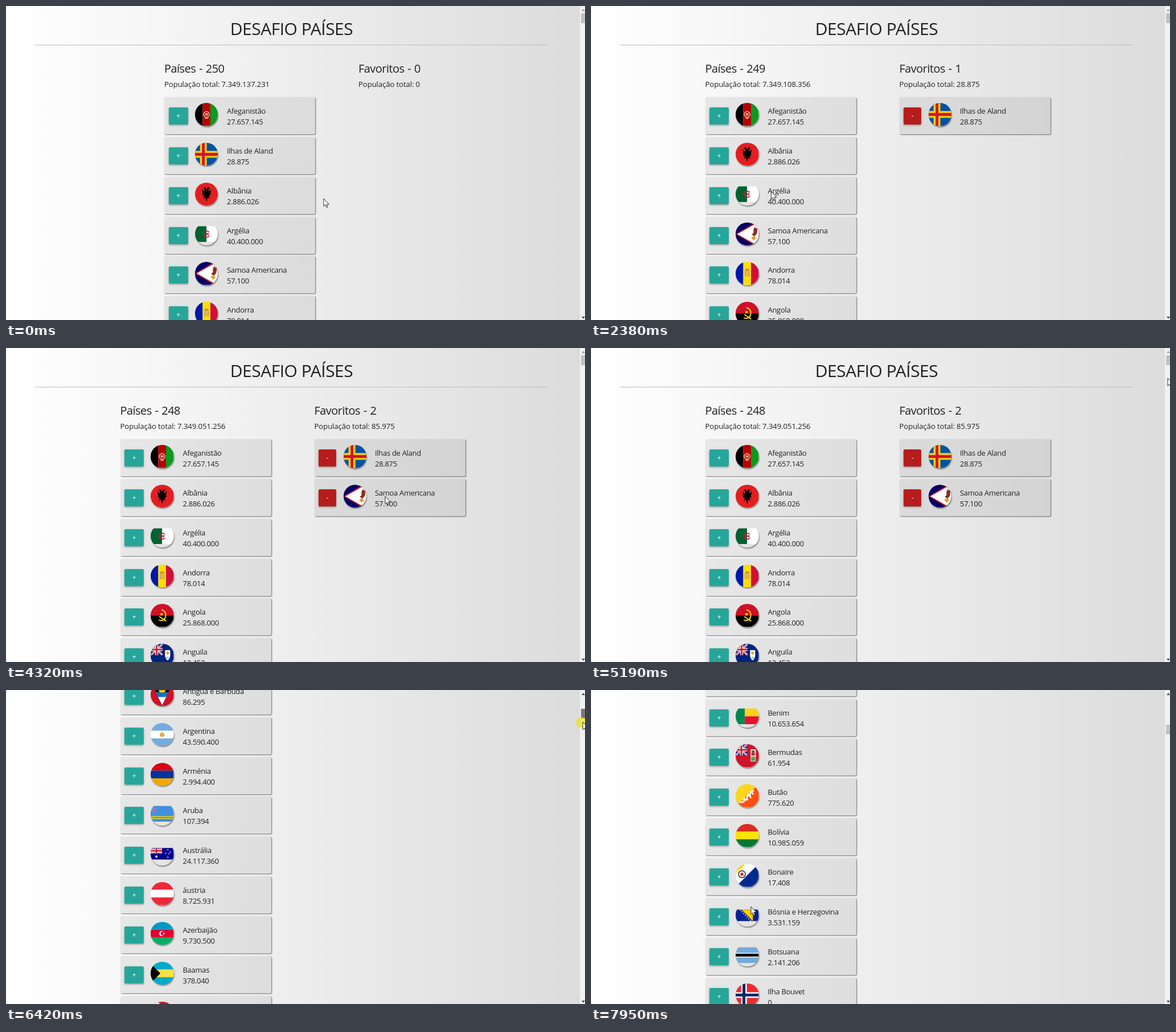
Recreate the animation shown at these times as an HTML page. Size 1017x551 px, loop 8 s.

```html
<!DOCTYPE html>
<html lang="pt">
<head>
<meta charset="utf-8">
<style>
html, body { margin: 0; width: 100%; height: 100%; overflow: hidden; }
body { position: relative; background: linear-gradient(to right, #fff, #dcdcdc 1008px); color: #212121; font: 13px/20px "Open Sans", "Noto Sans", sans-serif; letter-spacing: -.3px; }
body *, .col { position: absolute; white-space: nowrap; margin: 0; }
#page { left: 0; top: 0; width: 1003px; }
h1 { top: 20px; width: 100%; text-align: center; font-weight: 400; font-size: 30px; line-height: 40px; letter-spacing: -.5px; }
hr { left: 51px; top: 68px; width: 901px; height: 1px; border: 0; background: #bdbdbd; }
h2 { top: 96px; font-weight: 400; font-size: 20px; line-height: 28px; letter-spacing: -.55px; word-spacing: 1.2px; }
.total { top: 127px; font-size: 13.2px; letter-spacing: -.12px; }
.card { width: 265px; height: 65px; border-radius: 2px; background: rgba(0,0,0,.07); box-shadow: 1px 1px 2px rgba(0,0,0,.55); }
.btn { left: 7.5px; top: 18px; width: 34px; height: 30px; border-radius: 2px; background: #26a69a; color: #fff; font-size: 12px; line-height: 29px; text-align: center; box-shadow: 0 2px 2px rgba(0,0,0,.14), 0 1px 4px rgba(0,0,0,.2); }
.hover .btn { background: #2bbbad; }
.flag { left: 53.5px; top: 10px; width: 40.5px; height: 40.5px; border-radius: 50%; overflow: hidden; box-shadow: 1px 2px 2px rgba(0,0,0,.4); }
.name { left: 110px; top: 14px; }
.pop { left: 110px; top: 33px; }
#favs .btn { width: 31px; background: #b71c1c; }
#favs .flag { left: 51px; }
#favs .name, #favs .pop { left: 106.5px; }
#bar { left: 1008px; top: 0; width: 9px; height: 551px; background: #f1f1f1; }
#thumb { left: 2px; width: 7px; height: 17px; }
#bar i { left: 3px; border: 3px solid transparent; }
#up { top: 2px; border-bottom: 4px solid !important; }
#down { top: 545px; border-top: 4px solid #505050 !important; }
#spot { width: 19px; height: 19px; border-radius: 50%; background: rgba(240,225,0,.62); }
#cursor { width: 24px; height: 24px; overflow: visible; fill: #fff; stroke: #111; stroke-width: .9; stroke-linejoin: round; }
</style>
</head>
<body>
<div id="page">
  <h1>DESAFIO PAÍSES</h1><hr>
  <div class="col" id="list"></div>
  <div class="col" id="favs"></div>
</div>
<div id="bar"><i id="up"></i><i id="down"></i><div id="thumb"></div></div>
<div id="spot"></div>
<svg id="cursor"><path id="shape"/></svg>
<script>
const $ = id => document.getElementById(id);

// Flag parts, in a 40 x 40 box
const path = (d, c, extra = '') => `<path d="${d}" fill="${c}" ${extra}/>`;
const rect = (x, y, w, h, c) => path(`M${x} ${y}h${w}v${h}h${-w}z`, c);
const dot = (x, y, r, c) => `<circle cx="${x}" cy="${y}" r="${r}" fill="${c}"/>`;
const ring = (x, y, r, c, w) => `<circle cx="${x}" cy="${y}" r="${r}" fill="none" stroke="${c}" stroke-width="${w}"/>`;
const rows = (...cs) => cs.map((c, i) => rect(0, i * 40 / cs.length, 40, 40 / cs.length, c)).join('');
const cols = (...cs) => cs.map((c, i) => rect(i * 40 / cs.length, 0, 40 / cs.length, 40, c)).join('');
const star = (x, y, r, c, n = 5) => {
  let d = '';
  for (let i = 0; i < 2 * n; i++) {
    const a = i * Math.PI / n, q = i % 2 ? r * .42 : r;
    d += (i ? 'L' : 'M') + (x + q * Math.sin(a)).toFixed(2) + ' ' + (y - q * Math.cos(a)).toFixed(2);
  }
  return path(d + 'z', c);
};
const cross = (x, c, w) => rect(0, 20 - w / 2, 40, w, c) + rect(x - w / 2, 0, w, 40, c);
const jack = (y, w, h) => {
  const line = (d, c, s) => path(d, 'none', `stroke="${c}" stroke-width="${s}"`);
  const diag = `M0 0L${w} ${h}M0 ${h}L${w} 0`, plus = `M${w / 2} 0V${h}M0 ${h / 2}H${w}`;
  return `<svg y="${y}" width="${w}" height="${h}">${rect(0, 0, w, h, '#00247d')}${line(diag, '#fff', 3)}${line(diag, '#cf142b', 1)}${line(plus, '#fff', 5)}${line(plus, '#cf142b', 2.6)}</svg>`;
};
const crescent = (x, y, r, c, back) => dot(x, y, r, c) + dot(x + r * .3, y, r * .75, back);
const eagle = 'M20 12l-2-4-4 1 3 3-1 3-4-4 1 5-1 0 2 3-2 1 3 2-2 2 4-1-3 5 4-2 2 7 2-7 4 2-3-5 4 1-2-2 3-2-2-1 2-3-1 0 1-5-4 4-1-3 3-3-4-1z';

const countries = [
  ['Afeganistão', 27657145, cols('#000', '#b90000', '#0a9a1f') + ring(20, 20, 5, '#e8bba8', 1.5) + rect(17.5, 18, 5, 4, '#e0a58c') + rect(17, 26, 6, 1.5, '#e8bba8')],
  ['Ilhas de Aland', 28875, rect(0, 0, 40, 40, '#0053a5') + cross(14.5, '#ffce00', 11.8) + cross(14.5, '#d21034', 4.7)],
  ['Albânia', 2886026, rect(0, 0, 40, 40, '#e41e20') + path(eagle, '#000')],
  ['Argélia', 40400000, rect(0, 6.5, 20, 27, '#006233') + rect(20, 6.5, 20, 27, '#fff') + ring(20, 20, 5.3, '#d21034', 1.8) + rect(23, 17, 4, 6, '#fff') + star(22, 20, 3.2, '#d21034')],
  ['Samoa Americana', 57100, rect(0, 0, 40, 40, '#000066') + path('M0 20L40-4V44z', '#bd1021') + path('M3 20L40-1V41z', '#fff') + path('M33 8l5 3-1 8-4 5-5-3 3-3 0-6z', '#8a3021') + path('M27 26l5-3 4 4-5 4z', '#e0a030')],
  ['Andorra', 78014, cols('#0018a8', '#fedf00', '#d0103a') + rect(16, 14, 8, 11, '#d29a52') + rect(17.5, 16, 5, 8, '#e6b95c') + rect(17, 12, 6, 2, '#c7793b')],
  ['Angola', 25868000, rows('#ce1126', '#000') + path('M19 10q9 3 7 12t-12 6', 'none', 'stroke="#f9d616" stroke-width="2"') + path('M15 22L27 30', 'none', 'stroke="#f9d616" stroke-width="2"') + star(19, 18, 3.5, '#f9d616')],
  ['Anguila', 13452, rect(0, 0, 40, 40, '#00247d') + jack(0, 21, 20) + path('M25 11h9v10q-1 6-4.5 8-3.5-2-4.5-8z', '#fff') + dot(29.5, 16, 2.5, '#f49a26') + rect(27, 23, 5, 3, '#85cfe4')],
  ['Antártida', 1000, rect(0, 0, 40, 40, '#3a7dce') + path('M9 12l5 5 4-5 9 1 5 6-2 7-9 5-5-6-6-2z', '#fff')],
  ['Antígua e Barbuda', 86295, rect(0, 0, 40, 40, '#ce1126') + path('M2 0H38L20 38z', '#000') + star(20, 17, 11, '#fcd116', 8) + path('M9 16H31L20 38z', '#0072c6') + path('M13 24H27L20 38z', '#fff')],
  ['Argentina', 43590400, rows('#74acdf', '#fff', '#74acdf') + dot(20, 20, 3.8, '#d99a2b') + dot(20, 20, 2, '#f0bd50')],
  ['Arménia', 2994400, rows('#d90012', '#0033a0', '#f2a800')],
  ['Aruba', 107394, rect(0, 6.5, 40, 27, '#418fde') + rect(0, 24, 40, 1.5, '#f9d616') + rect(0, 27.5, 40, 1.5, '#f9d616') + star(6.5, 13, 4, '#fff', 4) + star(6.5, 13, 3, '#d21034', 4)],
  ['Austrália', 24117360, rect(0, 10, 40, 20, '#00008b') + jack(10, 20, 10) + star(10, 25, 3, '#fff', 7) + [[30, 13], [34, 17], [26, 19], [30, 26], [32, 20]].map(([x, y]) => star(x, y, 1.5, '#fff', 7)).join('')],
  ['áustria', 8725931, rows('#ed2939', '#fff', '#ed2939')],
  ['Azerbaijão', 9730500, rows('#0098c3', '#e00034', '#00ae65') + crescent(19.5, 20, 4.5, '#fff', '#e00034') + star(23, 20, 2.2, '#fff', 8)],
  ['Baamas', 378040, rows('#00abc9', '#fae042', '#00abc9') + path('M0 3L17 20 0 37z', '#000')],
  ['Bahrein', 1404900, rect(0, 0, 40, 40, '#ce1126') + path('M0 0H11l6 4-6 4 6 4-6 4 6 4-6 4 6 4-6 4 6 4-6 4H0z', '#fff')],
  ['Bangladesh', 161006790, rect(0, 0, 40, 40, '#006a4e') + dot(18, 20, 10, '#f42a41')],
  ['Barbados', 285000, cols('#00267f', '#ffc726', '#00267f') + path('M16 13q0 10 4 10t4-10M20 12V29', 'none', 'stroke="#000" stroke-width="2"')],
  ['Bielorrússia', 9498700, rect(0, 10, 40, 13.5, '#c8313e') + rect(0, 23.5, 40, 6.5, '#4aa657') + rect(0, 10, 5, 20, '#eba0a5')],
  ['Bélgica', 11319511, cols('#000', '#fae042', '#ed2939')],
  ['Belize', 370300, rect(0, 0, 40, 40, '#003f87') + rect(0, 0, 40, 4, '#ce1126') + rect(0, 36, 40, 4, '#ce1126') + dot(20, 20, 12, '#fff') + ring(20, 20, 10, '#4a9a4a', 1.5) + rect(15, 14, 10, 9, '#6fb5d8') + rect(16, 23, 8, 3, '#e2b43c')],
  ['Benim', 10653654, rect(0, 6.5, 16, 27, '#008751') + rect(16, 6.5, 24, 13.5, '#fcd116') + rect(16, 20, 24, 13.5, '#e8112d')],
  ['Bermudas', 61954, rect(0, 0, 40, 40, '#cf142b') + jack(0, 20, 20) + rect(26, 9, 9, 21, '#e9e3dc') + rect(27, 22, 7, 7, '#5a9a50') + dot(30.5, 17, 3.2, '#a73b35') + rect(28, 11, 5, 3, '#555')],
  ['Butão', 775620, rect(0, 0, 40, 40, '#ffd520') + path('M40 0V40H0z', '#ff4e12') + path('M8 32l6-1 1-5 5 1 0-6 5-1 1-6 6-3M14 24l4 5M21 17l6 7M26 12l5 6', 'none', 'stroke="#fff" stroke-width="2.6"')],
  ['Bolívia', 10985059, rows('#dd2c1e', '#f9e300', '#007934')],
  ['Bonaire', 17408, rect(0, 0, 40, 40, '#fff') + path('M40 0V40H0z', '#002a8f') + path('M0 0H17L0 17z', '#f9d90f') + ring(11, 18, 6, '#000', 1.2) + star(11, 18, 4.5, '#dc171d', 6)],
  ['Bósnia e Herzegovina', 3531159, rect(0, 10, 40, 20, '#002395') + path('M10 10H30V30z', '#fecb00') + [0, 1, 2, 3, 4, 5, 6].map(i => star(8 + i * 3, 11 + i * 3, 1.6, '#fff')).join('')],
  ['Botsuana', 2141206, rect(0, 6.5, 40, 27, '#75aadb') + rect(0, 16, 40, 8, '#fff') + rect(0, 17.5, 40, 5, '#000')],
  ['Ilha Bouvet', 0, rect(0, 0, 40, 40, '#ef2b2d') + cross(14.5, '#fff', 10) + cross(14.5, '#002868', 5)],
  ['Brasil', 206135893, rect(0, 0, 40, 40, '#009b3a') + path('M3 20L20 6 37 20 20 34z', '#fedf00') + dot(20, 20, 7, '#002776')]
];

const dots = n => String(n).replace(/\B(?=(\d{3})+$)/g, '.');
const STEP = 69.84;
const column = (title, count, total, items, sign) =>
  `<h2>${title} - ${count}</h2><div class="total">População total: ${dots(total)}</div>` +
  items.map(([name, pop, flag], i) => `<div class="card" style="top:${160 + i * STEP}px"><div class="btn">${sign}</div>
    <svg class="flag" viewBox="0 0 40 40">${flag}</svg>
    <div class="name">${name}</div><div class="pop">${dots(pop)}</div></div>`).join('');

let shown = -1;
function showLists(n) {
  if (n === shown) return;
  shown = n;
  const favs = [countries[1], countries[4]].slice(0, n);
  const sum = favs.reduce((s, c) => s + c[1], 0);
  $('list').innerHTML = column('Países', 250 - n, 7349137231 - sum, countries.filter(c => !favs.includes(c)), '+');
  $('favs').innerHTML = column('Favoritos', n, sum, favs, '-');
  $('list').style.left = (n ? 200.5 : 278) + 'px';
  $('favs').style.left = (n ? 541.5 : 619) + 'px';
}

// Bursts of movement: start, end, number of steps; the picture rests in between
const bursts = [[190, 980, 11], [1070, 1310, 4], [1480, 1580, 2], [1780, 1970, 3], [2130, 2880, 10], [2970, 3690, 9],
  [3790, 4570, 10], [4630, 5350, 10], [5450, 5860, 6], [6000, 6270, 4], [6420, 6840, 6], [6980, 7780, 10], [7880, 7950, 2]];
function snap(t) {
  let s = 0;
  for (const [a, b, n] of bursts) {
    const d = (b - a) / (n - 1);
    if (t >= a) s = a + Math.min(n - 1, Math.floor((t - a) / d + 1e-6)) * d;
  }
  return s;
}

const pointer = [[100, 558, 338], [500, 470, 300], [980, 338, 254], [1070, 326, 251], [1230, 304, 256], [1310, 313, 264],
  [1700, 313, 264], [1970, 326, 278], [2050, 326, 278], [2880, 302, 398], [3590, 247, 407], [3690, 238, 410], [3960, 238, 410],
  [4570, 984, 149], [5190, 1013, 53], [5350, 1013, 42], [5860, 1012, 26], [6000, 1012, 28], [6420, 1013, 56],
  [6980, 1011, 75], [7070, 1011, 76], [7780, 304, 352], [7950, 281, 380]];
const scrolling = [[5950, 0], [6270, 480], [6420, 671], [6840, 1490], [6980, 1585], [7065, 1611]];
function at(keys, t) {
  const i = keys.findIndex(k => k[0] > t);
  if (i < 0) return keys[keys.length - 1].slice(1);
  if (!i) return keys[0].slice(1);
  const a = keys[i - 1], b = keys[i], u = (t - a[0]) / (b[0] - a[0]);
  return a.slice(1).map((v, j) => v + (b[j + 1] - v) * u);
}

const ARROW = 'M0 0V13.5L3 10.8 5 15.5 7.2 14.6 5.2 10H9.5Z';
const HAND = 'M-1.5 1.2Q0-.8 1.5 1.2V6.5Q3 5.5 3.7 7 5.2 6.2 5.7 7.8 7.3 7.3 7.3 9V13L5.8 17.5H-1.5L-5 11.5Q-5.5 9-3 10L-1.5 11.5Z';
const within = (t, a, b) => t >= a && t < b;

function draw(now) {
  const t = snap(now % 8000), [x, y] = at(pointer, t), scroll = Math.round(at(scrolling, t)[0]);
  const n = t < 2130 ? 0 : t < 4300 ? 1 : 2;
  showLists(n);
  const hover = within(t, 1480, 2130) ? 1 : within(t, 3500, 4050) ? 3 : -1;
  $('list').querySelectorAll('.card').forEach((c, i) => c.classList.toggle('hover', i === hover));
  $('page').style.transform = `translateY(${-scroll}px)`;

  const drag = within(t, 6000, 7060);
  $('thumb').style.top = 13 + scroll * .0301 + 'px';
  $('thumb').style.background = drag ? '#787878' : within(t, 5690, 6000) ? '#a8a8a8' : '#c1c1c1';
  $('up').style.color = scroll ? '#505050' : '#a3a3a3';

  const pressed = drag || within(t, 1480, 1580) || within(t, 3790, 3870);
  $('spot').style.display = pressed ? '' : 'none';
  $('spot').style.transform = `translate(${x - 12}px,${y - 8.5}px)`;
  const hand = within(t, 1230, 1900) || within(t, 3500, 4050);
  $('shape').setAttribute('d', hand ? HAND : ARROW);
  $('cursor').style.transform = `translate(${x}px,${y}px)`;
}
const start = performance.now();
(function loop() {
  draw(performance.now() - start);
  requestAnimationFrame(loop);
})();
</script>
</body>
</html>
```
